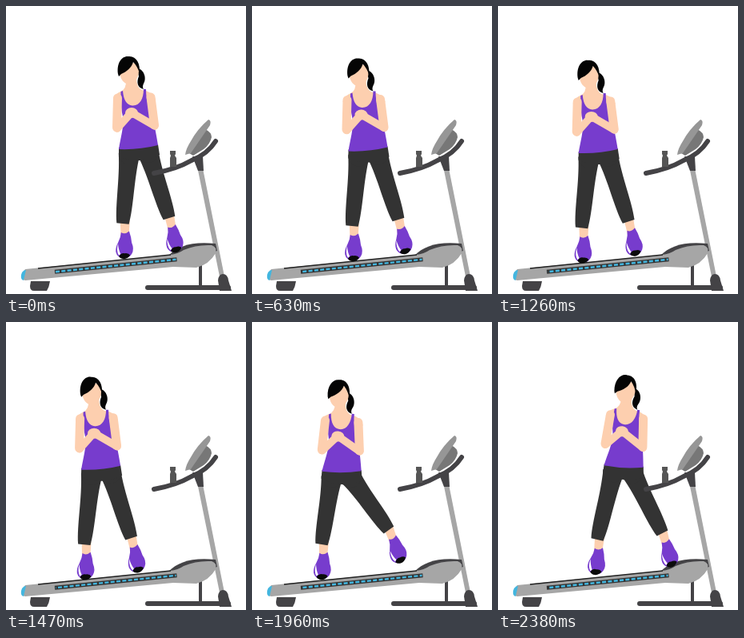
Animation, 300 px wide and 360 px high, one loop 2.45 s. Source, as an HTML page with a canvas:

```html
<!DOCTYPE html>
<html lang="en">
<head>
<meta charset="utf-8">
<title>Treadmill side step</title>
<style>
html, body { margin: 0; width: 100%; height: 100%; overflow: hidden; background: #fff; }
canvas { display: block; }
</style>
</head>
<body>
<canvas id="stage" width="300" height="360"></canvas>
<script>
const ctx = document.getElementById('stage').getContext('2d');
const LOOP = 2450, STEP = 70;
const SKIN = '#fdcfaf', PURPLE = '#773ccd', PANTS = '#333', DARK = '#444346', GREY = '#a6a6a6';
const BLUE = '#43b6df';
const HEM = [165.5, 177];
const DASH = LOOP * 0.033 / 11;

// time, hem x, hem y, lean (deg), left ankle x, y, right ankle x, y
const POSES = [
  [0, 165.5, 177, 0, 146, 272, 204, 265],
  [630, 145, 179.5, 0, 125, 275, 183, 267],
  [1680, 112, 183.5, 0, 91, 279, 150, 271],
  [1820, 109, 185, 1, 89, 279, 154, 269],
  [1960, 112, 187, 5, 87, 278, 171, 260],
  [2170, 127.5, 190, 14.5, 84, 277, 203, 254],
  [2240, 139, 187, 14.5, 85, 276, 207, 262],
  [2310, 149, 183.5, 12.5, 101, 273, 207, 264],
  [2380, 157, 181, 8.5, 124, 272, 205.5, 264],
  [LOOP, 165.5, 177, 0, 146, 272, 204, 265]
];

function poseAt(t) {
  const i = POSES.findIndex(p => p[0] > t);
  const a = POSES[i - 1], b = POSES[i];
  const k = (t - a[0]) / (b[0] - a[0]);
  return a.map((v, n) => v + (b[n] - v) * k);
}

function fill(color, d) {
  ctx.fillStyle = color;
  ctx.fill(new Path2D(d));
}

function line(color, width, d, cap = 'round') {
  ctx.strokeStyle = color;
  ctx.lineWidth = width;
  ctx.lineCap = cap;
  ctx.lineJoin = 'round';
  ctx.stroke(new Path2D(d));
}

function drawDeck(t) {
  line(DARK, 6, 'M177 352H278');
  line(DARK, 4, 'M243 322V350', 'butt');
  fill(DARK, 'M31 344H55Q54 351 51 356H35Q30 356 30 350Z');
  fill(GREY, 'M239.5 203L246 203L273 338L267 338Z');
  fill(DARK, 'M265 343Q266 335 271 335Q277 335 278 343L282 356H267Z');
  fill(DARK, 'M203 312C215 300 232 294 262 297L264 306L215 321Z');
  fill(GREY, 'M24 329L205 311Q215 310 222 305Q238 298 257 299Q264 301 262 309Q254 323 238 327L209 326L24 343Q19 342 20 335Z');
  fill(BLUE, 'M22.5 330.5L25 330L22 343Q18 342 19 336Q20 332 22.5 330.5Z');
  line('#222', 1.5, 'M40 328L206 311', 'butt');
  line(PANTS, 5, 'M61 332.3L213.5 316.7', 'butt');
  ctx.setLineDash([DASH * 0.68, DASH * 0.32]);
  ctx.lineDashOffset = t / LOOP * DASH * 11;
  line(BLUE, 2.4, 'M62 332.2L212.5 316.8', 'butt');
  ctx.setLineDash([]);
}

function drawConsole() {
  fill(DARK, 'M233 188H246L247 206H240Z');
  line(DARK, 6, 'M185 209Q213 204 232 193Q252 185 262 169');
  fill('#777', 'M249 154Q257 158 257 164Q255 173 247 179L234 187L229 184Z');
  fill('#969696', 'M253 142Q257 143 255 149L231 184L224 186Q225 178 231 169Q239 154 253 142Z');
  fill('#555', 'M205 181H212V185L211 187L213 190V201H205V190L206 187L205 185Z');
}

function drawShoe(ankle, tilt, shift) {
  ctx.save();
  ctx.translate(...ankle);
  ctx.rotate(tilt);
  ctx.translate(shift, 0);
  fill(SKIN, 'M-7 -4H5L5 16H-5Z');
  fill(PURPLE, 'M-5 11Q0 14 5 9Q8 16 9 23Q13 31 10 37Q7 43 0 43Q-8 43 -10 36Q-11 30 -8 24Q-5 17 -5 11Z');
  fill('#fff', 'M-8 25Q-7 33 -4 38L-6 40Q-10 35 -8 25Z');
  fill('#0b0b0b', 'M-6 41Q-3 36 1 37Q6 36 8 39Q5 44 0 44Q-4 44 -6 41Z');
  ctx.restore();
}

function drawLeg(hip, ankle, turn, shift) {
  const dx = ankle[0] - hip[0], dy = ankle[1] - hip[1], len = Math.hypot(dx, dy);
  const at = (k, d) => [hip[0] + dx * k - dy / len * d, hip[1] + dy * k + dx / len * d];
  drawShoe(ankle, Math.atan2(-dx, dy) * turn, shift);

  // thigh narrows towards the knee, calf swells again
  const edge = side => [at(0, 13.3 * side), at(0.35, 8.7 * side), at(0.75, 11.7 * side), at(1, 7.7 * side)];
  const [h1, k1, c1, a1] = edge(1), [h2, k2, c2, a2] = edge(-1);
  fill(PANTS, `M${h1}C${k1} ${c1} ${a1}L${a2}C${c2} ${k2} ${h2}Z`);
  ctx.beginPath();
  ctx.arc(...hip, 13, 0, Math.PI * 2);
  ctx.fill();
}

function drawTorso() {
  fill(PANTS, 'M141 177L190 173L192 186Q180 193 167 193Q152 193 141 188Z');
  fill('#050505', 'M164 78C173 79 176 91 172 97Q170 101 172 104C164 102 163 95 166 88Z');
  fill(SKIN, 'M150 91L163 90Q163 102 170 105Q184 107 187 117L182 128H140L134 117Q136 110 143 107Q151 104 150 91Z');
  fill(SKIN, 'M142 82C142 68 166 65 166 81C166 90 160 98 154 98C148 98 142 91 142 82Z');
  fill('#050505', 'M140 85C138 71 145 62 153 63C163 62 168 72 167 84Q164 75 159 70C157 77 151 82 144 85L141 88Z');
  fill(PURPLE, 'M143.5 107L146 106C147 118 151 124 158 124.5C167 125 172 116 172 104L175 104Q175 116 178 124C184 140 187 155 190 174Q166 180 141 179C143 165 148 150 146 138Q143 126 143.5 107Z');
  line(SKIN, 11, 'M139.5 115L138.5 152');
  line(SKIN, 11, 'M181 114L185.5 149');
  line(SKIN, 9.5, 'M139 153L155 135M186 150L160 135');
  ctx.beginPath();
  ctx.ellipse(157, 133.5, 8, 6.5, 0, 0, Math.PI * 2);
  ctx.fillStyle = SKIN;
  ctx.fill();
}

function drawWoman(t) {
  const [, x, y, lean, lx, ly, rx, ry] = poseAt(t);
  const angle = lean * Math.PI / 180, c = Math.cos(angle), s = Math.sin(angle);
  const hip = (dx, dy) => [x + dx * c - dy * s, y + dx * s + dy * c];
  drawLeg(hip(-11.5, 8), [lx, ly], 0.65, 3.5);
  drawLeg(hip(12, 6), [rx, ry], 0.5, 1.5);
  ctx.save();
  ctx.translate(x, y);
  ctx.rotate(angle);
  ctx.translate(-HEM[0], -HEM[1]);
  drawTorso();
  ctx.restore();
}

const start = performance.now();
function frame() {
  const elapsed = (performance.now() - start) % LOOP;
  const t = Math.floor(elapsed / STEP) * STEP;
  ctx.fillStyle = '#fff';
  ctx.fillRect(0, 0, 300, 360);
  drawDeck(t);
  drawWoman(t);
  drawConsole();
  requestAnimationFrame(frame);
}
frame();
</script>
</body>
</html>
```
